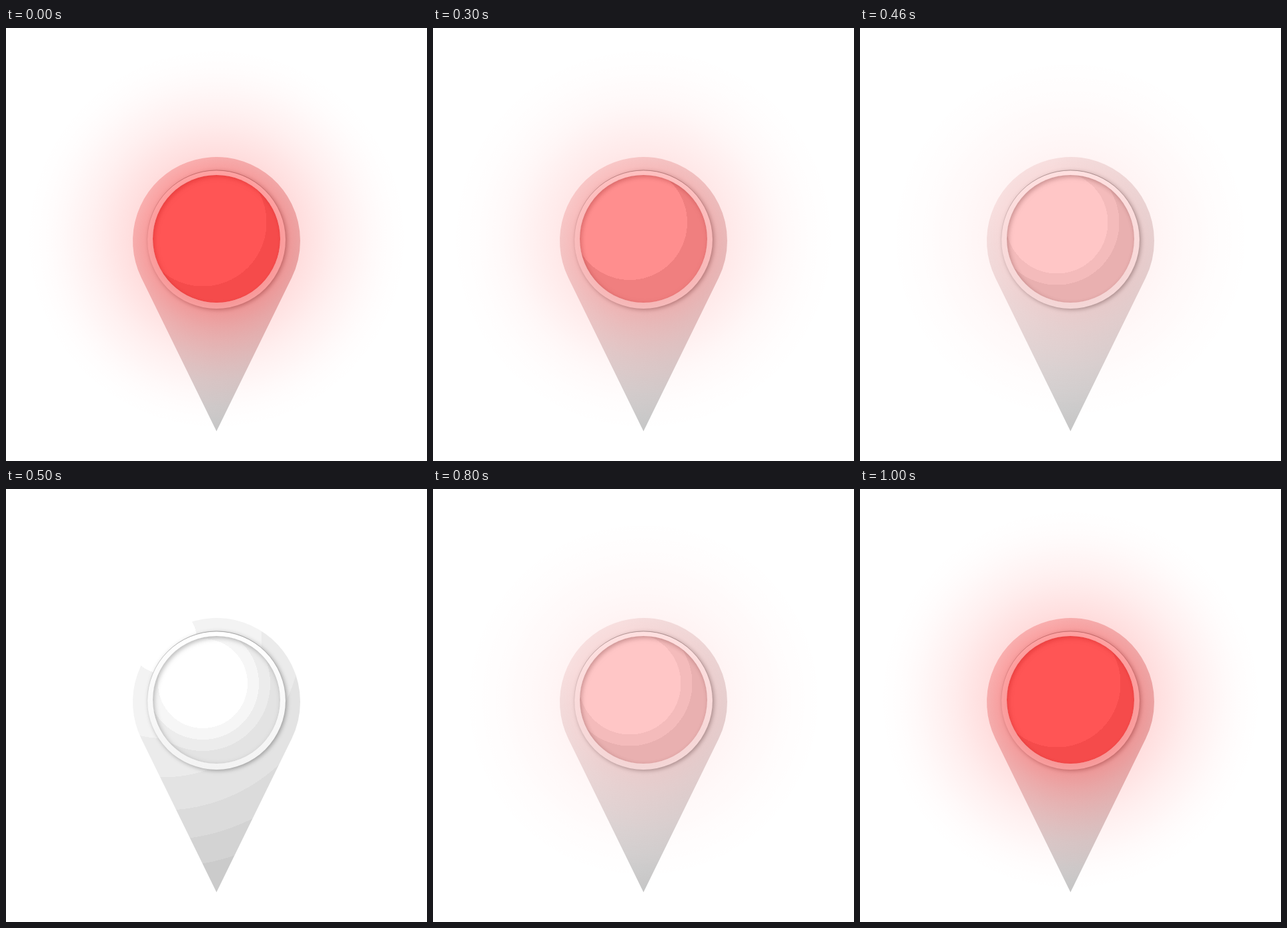
Write an HTML page with a canvas that moves like this. It is 631 by 648 pixels and loops after 1.1 s.

```html
<!DOCTYPE html>
<html lang="en">
<head>
<meta charset="utf-8">
<title>Pulsing pin</title>
<style>
  html, body { margin: 0; width: 100%; height: 100%; overflow: hidden; background: #fff; }
  canvas { display: block; }
</style>
</head>
<body>
<canvas id="stage" width="631" height="648"></canvas>
<script>
const ctx = document.getElementById('stage').getContext('2d');
const CX = 315.5, CY = 315.5, DISC_R = 95.5, RING_R = 103.5, GLOW_R = 290;
const LOOP = 1100, TOP_LEVEL = 3;

const grey = v => `rgb(${v},${v},${v})`;
const red = alpha => `rgba(255,0,0,${alpha})`;
const pin = pinPath(), disc = circle(DISC_R), ring = circle(RING_R, CY + 1);

function circle(r, y = CY) {
  const path = new Path2D();
  path.arc(CX, y, r, 0, Math.PI * 2);
  return path;
}

function pinPath() {
  const r = 125.5, y = 318.5, tip = 603.5;
  const a = Math.acos(r / (tip - y));
  const path = new Path2D();
  path.arc(CX, y, r, Math.PI / 2 + a, Math.PI / 2 - a);
  path.lineTo(CX, tip);
  path.closePath();
  return path;
}

// Radial gradient with steps + 1 stops; each stop is [radius, color]
function radial(x, y, radius, steps, stopAt) {
  const g = ctx.createRadialGradient(x, y, 0, x, y, radius);
  for (let k = 0; k <= steps; k++) {
    const [r, color] = stopAt(k);
    g.addColorStop(r / radius, color);
  }
  return g;
}

// Concentric flat tones: edge(k) is the outer radius of band k
function bands(x, y, radius, count, edge, tone) {
  return radial(x, y, radius, count * 2 - 1, i => {
    const k = i >> 1;
    const r = i % 2 ? edge(k) : k ? edge(k - 1) : 0;
    return [Math.min(r, radius), grey(tone(k))];
  });
}

function vertical(top, bottom, from, to) {
  const g = ctx.createLinearGradient(CX, top, CX, bottom);
  g.addColorStop(0, from);
  g.addColorStop(1, to);
  return g;
}

function shadow(color, blur, dx, dy) {
  ctx.shadowColor = color;
  ctx.shadowBlur = blur;
  ctx.shadowOffsetX = dx;
  ctx.shadowOffsetY = dy;
}

function drawPin(level) {
  const edge = k => 51 + 97 * k ** 0.68;
  ctx.fillStyle = level
    ? radial(235, 225, 390, 6, k => [edge(k), grey(247 - 8 * k)])
    : bands(235, 225, 390, 7, edge, k => k ? 251 - 8 * k : 255);
  ctx.fill(pin);
}

function drawRing() {
  ctx.save();
  shadow('rgba(0,0,0,.32)', 6, 2, 1.5);
  ctx.fillStyle = vertical(213, 420, '#fff', '#f3f3f3');
  ctx.fill(ring);
  ctx.restore();
  ctx.strokeStyle = vertical(213, 330, 'rgba(0,0,0,.3)', 'rgba(0,0,0,0)');
  ctx.stroke(ring);
}

function drawDisc(level) {
  const count = Math.max(1, TOP_LEVEL - level);
  const edge = k => k < count ? 67 + 9.5 * level + 17 * k : 140;
  ctx.save();
  ctx.clip(disc);
  ctx.fillStyle = bands(295, 291, 140, count + 1, edge, k => 255 - 28 * k / count);
  ctx.fill(disc);
  // Inner shadow cast by the ring
  shadow('rgba(0,0,0,.28)', 7, 2, 2.5);
  ctx.lineWidth = 10;
  ctx.strokeStyle = '#eee';
  ctx.stroke(circle(DISC_R + 5));
  ctx.restore();
}

// Red light fading from the rim of the disc outwards
function drawGlow(strength) {
  ctx.fillStyle = radial(CX, CY, GLOW_R, 10, k => {
    const t = k / 10;
    return [DISC_R + t * (GLOW_R - DISC_R), red(strength * (1 - t) ** 1.7)];
  });
  ctx.fillRect(0, 0, 631, 648);
}

function drawLight(strength) {
  const unlit = new Path2D(pin);
  unlit.addPath(disc);
  ctx.save();
  ctx.clip(unlit, 'evenodd');
  drawGlow(0.38 * strength);
  ctx.restore();
  ctx.fillStyle = red(strength * 2 / 3);
  ctx.fill(disc);
}

function draw(level) {
  const strength = level / TOP_LEVEL;
  ctx.fillStyle = '#fff';
  ctx.fillRect(0, 0, 631, 648);
  ctx.lineWidth = 1;
  drawGlow(0.18 * strength);
  drawPin(level);
  drawRing();
  drawDisc(level);
  drawLight(strength);
}

// The light steps down from 300 ms, stays off, and steps back up from 800 ms
function levelAt(time) {
  const n = Math.floor(time % LOOP / 100);
  return Math.min(TOP_LEVEL, Math.max(0, 5 - n, n - 7));
}

function tick() {
  draw(levelAt(performance.now()));
  requestAnimationFrame(tick);
}
tick();
</script>
</body>
</html>
```
